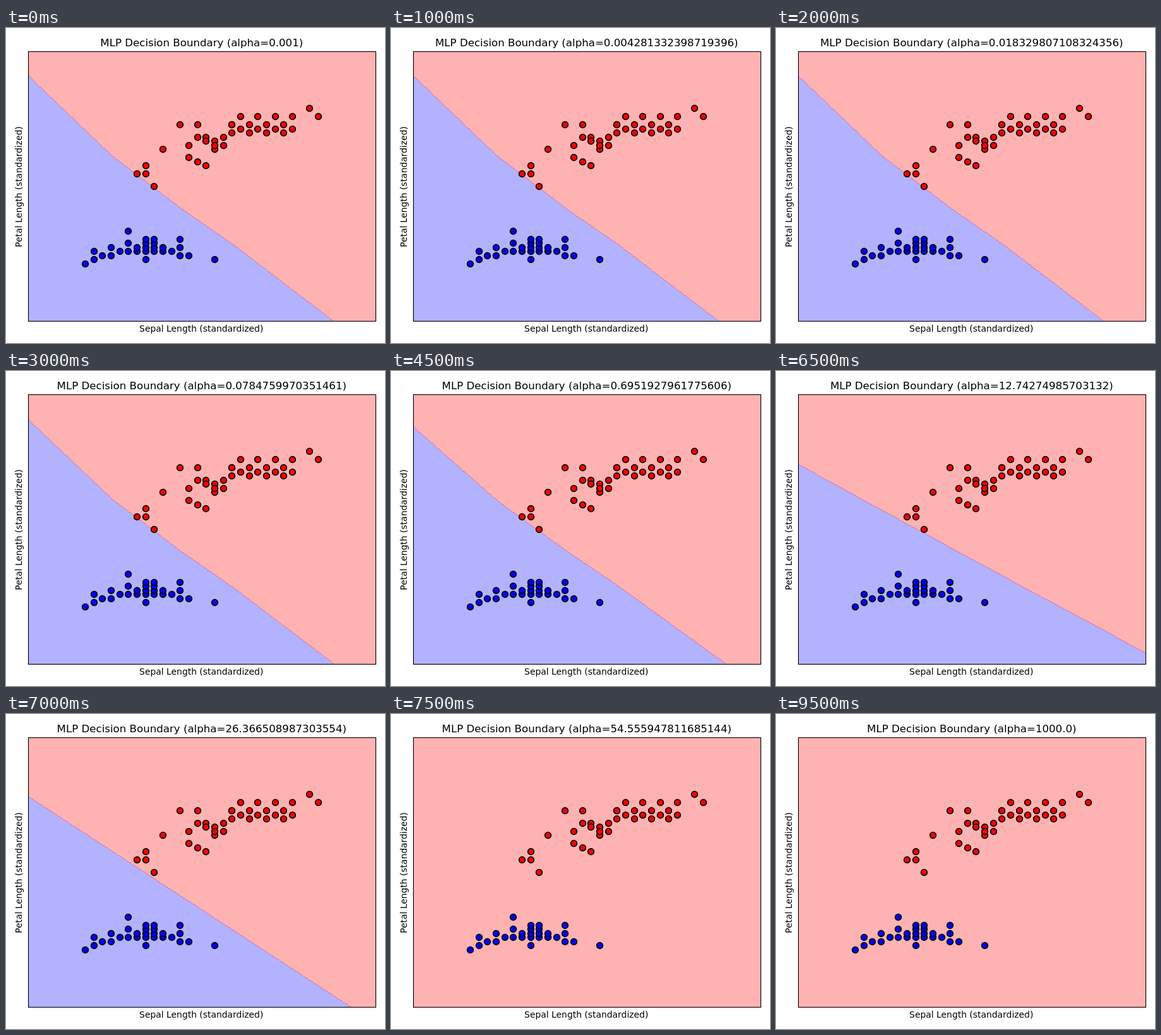
These frames come from a looping animation (600 px wide and 500 px high, 10000 ms). An HTML page with a canvas:

```html
<!DOCTYPE html>
<html lang="en">
<head>
<meta charset="utf-8">
<title>MLP Decision Boundary</title>
<style>
  html, body { margin: 0; width: 100%; height: 100%; overflow: hidden; background: #fff; }
  canvas { display: block; }
</style>
</head>
<body>
<canvas id="stage" width="600" height="500"></canvas>
<script>
const ctx = document.getElementById('stage').getContext('2d');
const FONT = '"DejaVu Sans", sans-serif';
const STEP = 500, COUNT = 20, LAST_SPLIT = 14;
const BOX = { x: 35.5, y: 37.5, w: 550, h: 428 };

const lerp = (a, b, t) => a + (b - a) * t;

// Log-spaced from 0.001 to 1000
const alphaAt = n => 10 ** (n * (6 / 19) - 3);
const alphaText = a => Number.isInteger(a) ? a.toFixed(1) : String(a);

// Dots are [sepal, petal] in millimetres; a few key points, the rest by rule
function blueDots() {
  const dots = [[48, 19], [50, 12], [54, 17], [58, 12]];
  for (let k = 43; k <= 55; k++) {
    const base = Math.round(14.4 - (k - 50) ** 2 / 15);
    const stack = Math.round(1 + 3 * Math.exp(-(((k - 50.5) / 1.2) ** 2)));
    for (let i = 0; i < stack; i++) dots.push([k, base + i]);
    if (stack === 1 && k % 2 === 0) dots.push([k, base + 2]);
  }
  return dots;
}

function redDots() {
  const dots = [[49, 33], [50, 33], [50, 35], [51, 30], [52, 39],
    [54, 45], [55, 40], [56, 45], [69, 49], [70, 47]];
  for (let i = 0; i < 3; i++) {
    dots.push([55 + i, 37 - i], [56 + i, 42 - i], [57 + i, 42 - i], [58 + i, 39 + 3 * i]);
  }
  for (let k = 60; k <= 67; k++) {
    const odd = k % 2;
    dots.push([k, 45 + 2 * odd], [k, 43 + odd]);
  }
  return dots;
}

const BLUE = blueDots(), RED = redDots();

// Bent edge of the weakly regularised model
const BENT = [[35.5, 76], [168, 203], [278, 287], [360, 344], [518, 465]];

function bentY(x) {
  let k = 1;
  while (k < BENT.length - 1 && x > BENT[k][0]) k++;
  const [x0, y0] = BENT[k - 1], [x1, y1] = BENT[k];
  return lerp(y0, y1, (x - x0) / (x1 - x0));
}

// Nearly straight edge of the strongly regularised model
function straightY(x, n) {
  const late = Math.max(0, n - 11), u = (x - BOX.x) / BOX.w;
  const tilt = Math.sin(Math.PI * late / 3);
  const left = 131 + 20 * tilt, right = 467 + 8 * late - 41 * tilt;
  return lerp(left, right, u) + (3 - late) * Math.sin(Math.PI * u);
}

function edgeY(x, n) {
  return lerp(bentY(x), straightY(x, n), Math.min(1, alphaAt(n) / 3));
}

function drawRegions(n) {
  const { x, y, w, h } = BOX, dx = 1.75, dy = 1.87;
  ctx.fillStyle = '#ffb2b2';
  ctx.fillRect(x, y, w, h);
  if (n > LAST_SPLIT) return;
  ctx.save();
  ctx.beginPath();
  ctx.rect(x, y, w, h);
  ctx.clip();
  // The class grid turns the edge into small steps
  const edge = new Path2D();
  for (let px = x; px <= x + w + dx; px += dx) {
    edge.lineTo(px, y + Math.round((edgeY(px, n) - y) / dy) * dy);
  }
  const area = new Path2D(edge);
  area.lineTo(x + w + 2 * dx, y + h + 60);
  area.lineTo(x, y + h + 60);
  ctx.fillStyle = '#b2b2ff';
  ctx.fill(area);
  ctx.strokeStyle = 'rgba(205, 50, 120, 0.5)';
  ctx.lineWidth = 1;
  ctx.stroke(edge);
  ctx.restore();
}

function drawDots(dots, color) {
  const snap = v => Math.floor(v) + 0.5;
  ctx.fillStyle = color;
  ctx.strokeStyle = '#000';
  ctx.lineWidth = 1.8;
  for (const [sepal, petal] of dots) {
    ctx.beginPath();
    ctx.arc(snap(125.5 + 13.67 * (sepal - 43)), snap(374.4 - 6.49 * (petal - 11)), 4.8, 0, 2 * Math.PI);
    ctx.fill();
    ctx.stroke();
  }
}

function label(text, x, y, size, turn = 0) {
  ctx.save();
  ctx.translate(x, y);
  ctx.rotate(turn);
  ctx.font = `${size}px ${FONT}`;
  ctx.textAlign = 'center';
  ctx.fillStyle = '#000';
  ctx.fillText(text, 0, 0);
  ctx.restore();
}

function draw(n) {
  ctx.fillStyle = '#fff';
  ctx.fillRect(0, 0, 600, 500);
  drawRegions(n);
  drawDots(BLUE, '#00f');
  drawDots(RED, '#f00');
  ctx.strokeStyle = '#000';
  ctx.lineWidth = 1.11;
  ctx.strokeRect(BOX.x, BOX.y, BOX.w, BOX.h);
  label(`MLP Decision Boundary (alpha=${alphaText(alphaAt(n))})`, 309.8, 29, 16.64);
  label('Sepal Length (standardized)', 309.2, 482, 13.9);
  label('Petal Length (standardized)', 25, 252, 13.9, -Math.PI / 2);
}

const start = performance.now();
let shown = -1;
function tick() {
  const n = Math.floor((performance.now() - start) / STEP) % COUNT;
  if (n !== shown) draw(shown = n);
  requestAnimationFrame(tick);
}
tick();
</script>
</body>
</html>
```
